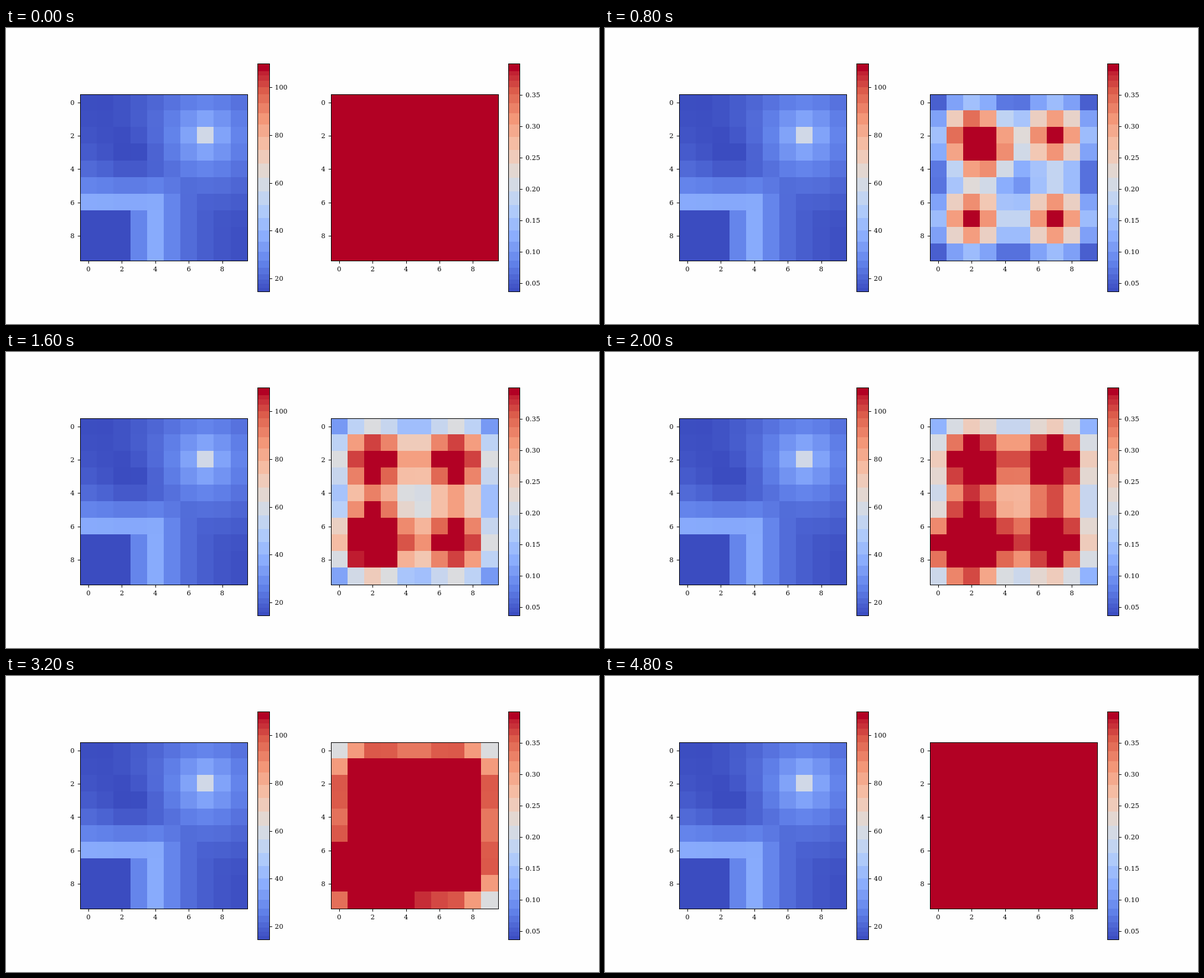
Write an HTML page that moves like this. It is 1000 px wide and 500 px high and loops after 6000 ms.

```html
<!DOCTYPE html>
<html lang="en">
<head>
<meta charset="utf-8">
<title>Heat maps</title>
<style>
html, body { margin: 0; width: 100%; height: 100%; overflow: hidden; background: #fefefe; }
svg { display: block; width: 100vw; height: 100vh; }
text { font: 11.11px "DejaVu Serif", serif; fill: #000; }
rect, line { shape-rendering: crispEdges; }
.frame { fill: none; stroke: #000; }
.tick { stroke: #000; }
</style>
</head>
<body>
<svg id="stage" viewBox="0 0 1000 500"></svg>
<script>
const N = 10, CELL = 28.18, TOP = 111.6;
const BAR_TOP = 60, BAR_HEIGHT = 385, BAR_WIDTH = 19.25, BANDS = 26;
const STEP = 200, LOOP = 6000, LAST = 24;
const stage = document.getElementById("stage");

// Blue to red, evenly spaced stops.
const STOPS = [
  [59, 76, 192], [98, 130, 234], [141, 176, 254], [184, 208, 249],
  [221, 221, 221], [245, 196, 173], [244, 154, 123], [222, 96, 77], [178, 1, 36]
];

const mix = (a, b, u) => a + (b - a) * u;
const clamp = (v, lo, hi) => Math.max(lo, Math.min(hi, v));
const snap = v => Math.round(v) + 0.5;
const bell = (d2, variance) => Math.exp(-d2 / (2 * variance));

// The top few percent saturate to plain red.
function colour(t) {
  const s = t > 0.97 ? STOPS.length - 1 : clamp(t, 0, 1) * (STOPS.length - 1);
  const i = Math.min(Math.floor(s), STOPS.length - 2);
  return `rgb(${STOPS[i].map((c, j) => Math.round(mix(c, STOPS[i + 1][j], s - i)))})`;
}

function add(tag, attrs, label) {
  const node = document.createElementNS("http://www.w3.org/2000/svg", tag);
  for (const key in attrs) node.setAttribute(key, attrs[key]);
  if (label !== undefined) node.textContent = label;
  stage.appendChild(node);
  return node;
}

const box = (x1, y1, x2, y2, attrs) =>
  add("rect", { x: x1, y: y1, width: x2 - x1, height: y2 - y1, ...attrs });
const tick = (x1, y1, x2, y2) => add("line", { class: "tick", x1, y1, x2, y2 });

function heatmap(left) {
  const xEdge = i => Math.round(left + i * CELL);
  const yEdge = i => Math.max(112, Math.round(TOP - 0.8 + i * CELL));
  const cells = Array.from({ length: N * N }, (_, i) => {
    const x = i % N, y = Math.floor(i / N);
    return { x, y, node: box(xEdge(x), yEdge(y), xEdge(x + 1), yEdge(y + 1)) };
  });
  const bottom = TOP + N * CELL, x0 = Math.round(left);
  box(snap(left), snap(TOP), snap(left + N * CELL), snap(bottom), { class: "frame" });
  for (let v = 0; v < N; v += 2) {
    const x = left + (v + 0.5) * CELL, y = TOP + (v + 0.5) * CELL;
    tick(snap(x), 394, snap(x), 398);
    tick(x0 - 4, snap(y), x0, snap(y));
    add("text", { x, y: 411.4, "text-anchor": "middle" }, v);
    add("text", { x: x0 - 9.4, y: Math.round(y) + 4, "text-anchor": "end" }, v);
  }
  return cells;
}

// Bands are narrow at both ends and wide in the middle.
function colourBar(left, lo, hi, first, step, digits) {
  const right = left + BAR_WIDTH, bottom = BAR_TOP + BAR_HEIGHT;
  const cut = i => i / BANDS - 0.6 * Math.sin(2 * Math.PI * i / BANDS) / (2 * Math.PI);
  const yCut = i => Math.round(BAR_TOP + BAR_HEIGHT * cut(i));
  for (let i = 0; i < BANDS; i++) {
    box(Math.round(left), yCut(i), Math.round(right), yCut(i + 1),
      { fill: colour(1 - (cut(i) + cut(i + 1)) / 2) });
  }
  box(snap(left), snap(BAR_TOP), snap(right), snap(bottom), { class: "frame" });
  for (let v = first; v < hi - step / 10; v += step) {
    const y = bottom - (v - lo) / (hi - lo) * BAR_HEIGHT;
    const x = Math.round(right) + 1;
    tick(x, snap(y), x + 4, snap(y));
    add("text", { x: right + 9.7, y: Math.round(y) + 4 }, v.toFixed(digits));
  }
}

// A hot spot, an L-shaped ridge with a cold floor inside it, and a hollow.
function terrain(x, y) {
  if (x < 3 && y > 6) return 14;
  const spot = Math.hypot(x - 7, y - 2);
  const ridge = Math.min(
    Math.hypot(Math.max(0, x - 4), y - 6),
    Math.hypot(x - 4, Math.max(0, 6 - y)));
  const hollow = 5 * bell((x - 2.5) ** 2 + (y - 3.5) ** 2, 1.5);
  return 14 - hollow + Math.max(44 / (1 + spot) - 0.9 * spot, 23 * Math.exp(-0.55 * ridge));
}

const LO = 0.0368, HI = 0.4;
const paint = (cell, t) => cell.node.setAttribute("fill", colour(t));

heatmap(125).forEach(c => paint(c, (terrain(c.x, c.y) - 14.5) / 95.5));
colourBar(424.4, 14.5, 110, 20, 20, 0);
const cells = heatmap(547.73);
colourBar(847.1, LO, HI, 0.05, 0.05, 2);

// Wandering peak every fourth step: x, y, height.
const PATH = [[3, 2, 0.25], [3, 3, 0.25], [2, 6.6, 0.2], [1, 8, 0.35], [2, 8, 0.38]];

function wanderer(step) {
  const s = Math.min(step / 4, PATH.length - 1);
  const i = Math.min(Math.floor(s), PATH.length - 2);
  return PATH[i].map((v, j) => mix(v, PATH[i + 1][j], s - i));
}

function draw(ms) {
  const step = Math.min(Math.floor(ms / STEP), LAST);
  const full = step % LAST === 0;
  const [px, py, height] = wanderer(step);
  // Four fixed peaks rise and spread with each step.
  const ridge = v => (0.592 + 0.0085 * step) *
    (bell((v - 2) ** 2, 1.2 + 0.2 * step) + bell((v - 7) ** 2, 1.2 + 0.2 * step));
  for (const c of cells) {
    const d2 = (c.x - px) ** 2 + (c.y - py) ** 2;
    const value = ridge(c.x) * ridge(c.y) + height * bell(d2, 1 + 0.08 * step);
    paint(c, full ? 1 : (value - LO) / (HI - LO));
  }
}

const start = performance.now();
function loop() {
  draw((performance.now() - start) % LOOP);
  requestAnimationFrame(loop);
}
loop();
</script>
</body>
</html>
```
